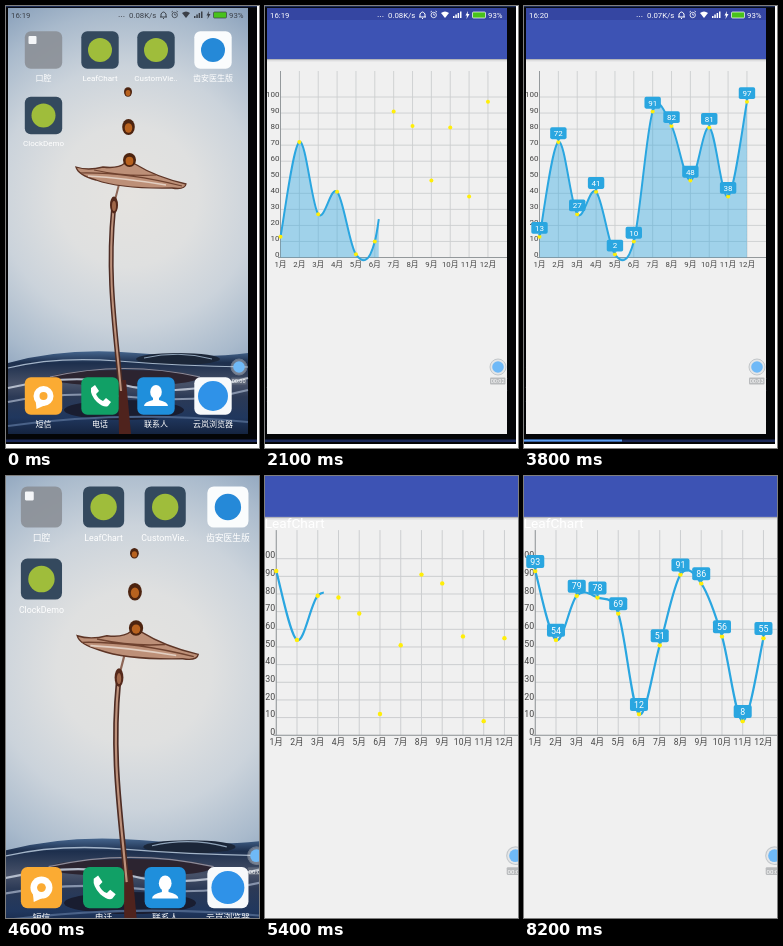
Animation, 253 px wide and 442 px high, one loop 8600 ms. Source, as an HTML page:

```html
<!DOCTYPE html>
<html lang="zh">
<head>
<meta charset="utf-8">
<title>Line chart demo</title>
<style>
html, body { margin: 0; width: 100%; height: 100%; overflow: hidden; background: #fff; }
svg { display: block; width: 100%; height: 100%; }
text { font-family: Roboto, "Noto Sans CJK SC", "Noto Sans CJK", sans-serif; }
</style>
</head>
<body>
<svg id="stage" viewBox="0 0 253 442" preserveAspectRatio="none"></svg>
<script>
const LOOP = 8600, CUT = 3900;
const X0 = 15.5, STEP = 18.86, BASE = 251.5, UNIT = 1.605;
const BLUE = '#2aa6e0';
const $ = id => document.getElementById(id);
const clamp = v => Math.max(0, Math.min(1, v));
const lerp = (a, b, k) => a + (b - a) * k;
const range = n => [...Array(n).keys()];

// progress: [time, fraction of line length]
const clips = [
  { id: 'a', open: 800, labels: 3600, area: true,
    values: [13, 72, 27, 41, 2, 10, 91, 82, 48, 81, 38, 97],
    progress: [[960, 0], [3600, 1]] },
  { id: 'b', open: 4600, labels: 7400, area: false,
    values: [93, 54, 79, 78, 69, 12, 51, 91, 86, 56, 8, 55],
    progress: [[5035, 0], [6600, .812], [6700, .812], [7150, .987], [7500, 1]] }
];

const rect = (x, y, w, h, fill, more = '') =>
  `<rect x="${x}" y="${y}" width="${w}" height="${h}" fill="${fill}" ${more}/>`;
const oval = (x, y, rx, ry, fill, more = '') =>
  `<ellipse cx="${x}" cy="${y}" rx="${rx}" ry="${ry}" fill="${fill}" ${more}/>`;
const shape = (d, fill, more = '') => `<path d="${d}" fill="${fill}" ${more}/>`;
const stroke = (d, color, w = 1) =>
  `<path d="${d}" fill="none" stroke="${color}" stroke-width="${w}"/>`;
const text = (s, x, y, size, fill, anchor = 'middle', more = '') =>
  `<text x="${x}" y="${y}" font-size="${size}" fill="${fill}" text-anchor="${anchor}" ${more}>${s}</text>`;
const stops = list => list.map(([o, c]) => `<stop offset="${o}" stop-color="${c}"/>`).join('');

const app = (x, y, color, label, inner = '') =>
  `<g transform="translate(${x} ${y})">` +
  rect(-18.7, -18.7, 37.4, 37.4, color, 'rx="6"') + inner +
  text(label, 0, 30.5, 8, '#fff') + '</g>';

function wallpaper() {
  const stem = 'M107.500 203C101 270 109 320 115 385';
  const disc = 'M70 161Q82 165 97 161Q112 163 119 157Q124 154 129 158Q150 171 180 178Q179 184 166 182' +
    'Q115 183 90 174Q72 169 70 161Z';
  return rect(2, 2, 240, 426, 'url(#sky)') +
    shape('M2 357Q60 341 130 347T242 347V428H2Z', 'url(#water)') +
    oval(172, 353, 42, 6, '#1b2638') +
    stroke('M138 352Q172 344 206 353', '#8fa3b8', 1) +
    stroke('M2 362Q50 350 112 355T242 361', '#a3b4c8', 1.2) +
    oval(118, 372, 74, 8, '#2c2430') +
    stroke('M44 371Q118 354 194 371', '#8c8a98', 1.2) +
    stroke('M2 382Q70 366 118 379T242 372', '#b4bccb', 2) +
    stroke('M2 396Q60 384 125 391T242 384', '#8693ab', 2) +
    oval(118, 404, 60, 10, '#191d30') +
    stroke('M2 420Q118 404 242 416', '#4a6288', 2) +
    shape('M112 374h8l5 54h-12Z', '#4f231d') +
    stroke('M118 160Q113 178 109 194', '#8d6656', 2) +
    stroke(stem, '#4d2c24', 5) + stroke(stem, '#bd917b', 2) +
    oval(108, 199, 4, 8.5, '#55291b') + oval(108, 200, 2, 5, '#a0674a') +
    shape(disc, '#bd9078', 'stroke="#5e3526" stroke-width="1.3"') +
    stroke('M74 167Q120 166 176 180M88 164Q120 171 150 169', '#6f422f', 1.2) +
    stroke('M82 170Q118 172 160 179', '#e3cfc2', 1.6) +
    [[122, 86, 4, 4.8], [122.5, 121, 6.3, 8], [123.5, 154, 6.5, 7]].map(([x, y, a, b]) =>
      oval(x, y, a, b, '#4d2410') + oval(x, y + 1, a * .6, b * .6, '#b8621f')).join('');
}

function icons() {
  const disc = (r, c) => oval(0, 0, r, r, c);
  return app(37.5, 44, '#8a8f96e0', '口腔', rect(-15, -14, 8, 8, '#f4f6f8', 'rx="1"')) +
    app(94, 44, '#34495e', 'LeafChart', disc(12, '#9fbd3b')) +
    app(150, 44, '#34495e', 'CustomVie..', disc(12, '#9fbd3b')) +
    app(207, 44, '#fafcfd', '齿安医生版', disc(12, '#2589d8')) +
    app(37.5, 109.5, '#34495e', 'ClockDemo', disc(12, '#9fbd3b')) +
    app(37.5, 390, '#fbab33', '短信', disc(10, '#fff') + shape('M-8 3L-7 13L2 9Z', '#fff') + disc(4, '#fbab33')) +
    app(94, 390, '#11a066', '电话',
      shape('M-9 -8L-5 -11L-1 -5L-4 -2Q-2 3 3 5L6 2L11 6L8 10Q4 12 -3 6Q-10 -1 -9 -8Z', '#fff')) +
    app(150, 390, '#1f8fdc', '联系人', oval(0, -4, 5.8, 7, '#fff') +
      shape('M-3 2H3V4Q12 6 12 10H-12Q-12 6 -3 4Z', '#fff')) +
    app(207, 390, '#f7f9fb', '云岚浏览器', disc(15, '#2f92e8'));
}

function statusBar() {
  return '<g id="status">' +
    text('16:19', 5, 12, 7.8, 'currentColor', 'start', 'id="clock"') +
    text('...', 112, 11, 9, 'currentColor', 'start') +
    text('0.08K/s', 123, 12, 7.8, 'currentColor', 'start', 'id="speed"') +
    stroke('M154 11h7M155 11V8Q157.500 4 160 8V11M157 12.500h1', 'currentColor') +
    stroke('M166 9a2.700 2.700 0 1 0 5.400 0a2.700 2.700 0 1 0 -5.400 0M168.700 7.500V9H170M165.500 6l1.500 -1M172 6l-1.500 -1', 'currentColor', .8) +
    shape('M176 7Q180 4 184 7L180 12Z', 'currentColor') +
    shape('M188 12v-2h1.500v2ZM190.300 12V8.500h1.500V12ZM192.600 12V7h1.500v5ZM195 12V5.500h1.500V12Z', 'currentColor') +
    shape('M203 5L200.500 9.500H202L201.500 13L204.500 8H202.700Z', 'currentColor') +
    rect(207.5, 6, 13, 6, '#48c21b', 'rx="1" stroke="currentColor" stroke-width=".7"') +
    text('93%', 223, 12, 7.8, 'currentColor', 'start') + '</g>';
}

function chart({ id, values, area }) {
  const pts = values.map((v, i) => [X0 + i * STEP, BASE - v * UNIT]);
  const at = i => pts[Math.max(0, Math.min(pts.length - 1, i))];
  // control point: p pushed along the chord of its neighbours
  const handle = (i, s) => at(i).map((p, k) => p + s * (at(i + 1)[k] - at(i - 1)[k]) / 6);
  const curve = 'M' + pts[0] + pts.slice(1).map((p, i) =>
    `C${handle(i, 1)} ${handle(i + 1, -1)} ${p}`).join('');
  const end = X0 + 11 * STEP;
  return `<g id="chart-${id}">` +
    stroke(range(10).map(i => `M${X0} ${BASE - (i + 1) * 10 * UNIT}H242`).join('') +
      range(11).map(i => `M${X0 + (i + 1) * STEP} 65V${BASE}`).join(''), '#ccced0', .9) +
    stroke(`M13 ${BASE}H242M${X0} 65V${BASE}`, '#8a8f92', .9) +
    range(11).map(i => text(i * 10, 14.5, BASE - .2 - i * 10 * UNIT, 8, '#444', 'end')).join('') +
    range(12).map(i => text(i + 1 + '月', X0 + i * STEP, 260.8, 7.8, '#444')).join('') +
    `<clipPath id="sweep-${id}"><rect y="0" height="442" id="reveal-${id}"/></clipPath>` +
    (area ? shape(`${curve}L${end} ${BASE}H${X0}Z`, BLUE, `fill-opacity=".4" clip-path="url(#sweep-${id})"`) : '') +
    shape(curve, 'none', `id="line-${id}" stroke="${BLUE}" stroke-width="2"`) +
    pts.map(([x, y]) => oval(x, y, 2, 2, '#ffee08')).join('') +
    `<g id="labels-${id}">` + pts.map(([x, y], i) =>
      rect(x - 8.2, y - 14.6, 16.4, 11.8, BLUE, 'rx="1.8"') +
      shape(`M${x - 2} ${y - 3}h4l-2 2Z`, BLUE) +
      text(values[i], x, y - 5.8, 8, '#fff')).join('') + '</g></g>';
}

$('stage').innerHTML = `<defs>
  <radialGradient id="sky" gradientUnits="userSpaceOnUse" cx="122" cy="190" r="235">${
    stops([[0, '#e5e3e0'], [.3, '#dfe0e0'], [.55, '#cbd3db'], [.78, '#a9bacc'], [1, '#7f98b5']])}</radialGradient>
  <linearGradient id="water" x2="0" y2="1">${
    stops([[0, '#45658d'], [.14, '#1d2f4d'], [.4, '#475168'], [.55, '#2c3a56'], [.8, '#20375e'], [1, '#152440']])}</linearGradient>
  <clipPath id="opening"><rect id="window"/></clipPath></defs>` +
  rect(0, 0, 251, 438, '#040507') + rect(0, 0, 251, 1.2, '#1c2c55') + rect(0, 433.5, 251, 2.5, '#1a2858') +
  rect(0, 433.5, 0, 2, '#5b9df0', 'id="bar"') +
  '<g id="phone">' + wallpaper() + icons() +
  '<g clip-path="url(#opening)">' + rect(2, 2, 240, 426, '#f0f0f0') +
  rect(2, 53, 240, 1.2, '#b4b5ba') + rect(2, 54.2, 240, 1.2, '#dcdcde') +
  rect(2, 2, 240, 51, '#3d53b4') + rect(2, 2, 240, 12, '#3546a2') +
  text('LeafChart', 5, 63, 12.4, '#fff', 'start', 'id="title"') +
  clips.map(chart).join('') + '</g>' + statusBar() +
  oval(233, 361, 8, 8, '#e4e6e8', 'stroke="#c3c7ca" stroke-width="1" id="ring"') + oval(233, 361, 5.8, 5.8, '#6fb9f7') +
  rect(225, 371.5, 15.5, 7, '#b9bbbd', 'rx="1" id="badge"') +
  text('00:00', 232.7, 377.2, 5.6, '#fff', 'middle', 'id="timer"') + '</g>';

function progressAt(keys, t) {
  const n = keys.findIndex(k => t < k[0]);
  if (n < 0) return 1;
  if (!n) return 0;
  const [[t0, p0], [t1, p1]] = keys.slice(n - 1, n + 1);
  return lerp(p0, p1, (t - t0) / (t1 - t0));
}

const set = (id, attrs) => { for (const k in attrs) $(id).setAttribute(k, attrs[k]); };

function draw(t) {
  const second = t >= CUT, clip = clips[+second], { id } = clip;
  set('phone', { transform: second ? 'translate(-5.8 -17.4) scale(1.1)' : '' });
  clips.forEach(c => set('chart-' + c.id, { display: c === clip ? 'inline' : 'none' }));
  set('title', { display: second ? 'inline' : 'none' });

  // the app window grows out of its icon
  const grow = Math.max(0, (t - clip.open) / 300), k = clamp(grow), settled = grow > 1;
  const left = lerp(75, 2, k), top = lerp(25, 2, k);
  set('window', { x: left, y: top,
    width: grow ? lerp(113, 242, k) - left : 0,
    height: Math.min(428, lerp(62, 354, grow)) - top });
  set('chart-' + id, { transform: `translate(0 ${settled ? 0 : 2})` });

  const line = $('line-' + id), total = line.getTotalLength();
  const len = total * progressAt(clip.progress, t);
  set('line-' + id, { 'stroke-dasharray': `${len} ${total + 9}`, visibility: len ? 'visible' : 'hidden' });
  set('reveal-' + id, { width: len ? line.getPointAtLength(len).x : 0 });
  set('labels-' + id, { opacity: clamp((t - clip.labels) / 200) });

  const late = t >= 2600;
  set('status', { color: settled ? '#fff' : '#3b4048' });
  $('clock').textContent = late ? '16:20' : '16:19';
  $('speed').textContent = late ? '0.07K/s' : '0.08K/s';
  $('timer').textContent = '00:0' + Math.max(0, Math.floor((t - (second ? CUT : 100)) / 1000));
  set('badge', { opacity: settled ? 1 : .25 });
  set('ring', { opacity: settled ? 1 : .4 });
  set('bar', { width: second ? 0 : 98 * clamp((t - 3300) / 500) });
}

const start = performance.now();
function tick(now) {
  // the picture advances ten times a second
  draw(Math.floor(Math.max(0, now - start) % LOOP / 100) * 100);
  requestAnimationFrame(tick);
}
tick(start);
</script>
</body>
</html>
```
